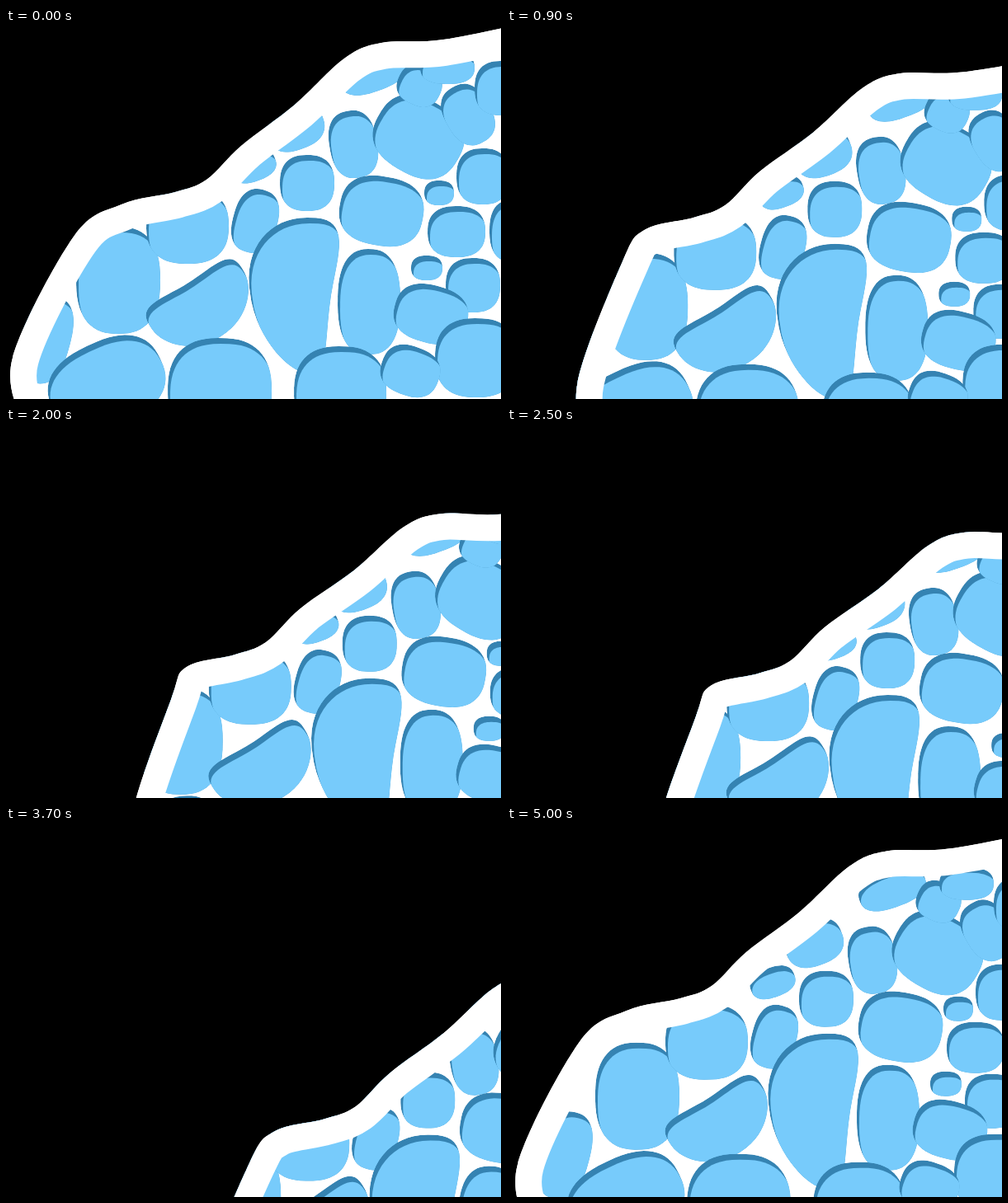
Recreate the animation shown at these times as an HTML page with a canvas. Size 600 by 450 pixels, loop 5100 ms.

```html
<!DOCTYPE html>
<html lang="en">
<head>
<meta charset="utf-8">
<title>Foam wave</title>
<style>
  html, body { margin: 0; width: 100%; height: 100%; overflow: hidden; background: #000; }
  canvas { display: block; }
</style>
</head>
<body>
<canvas id="stage" width="600" height="450"></canvas>
<script>
const ctx = document.getElementById('stage').getContext('2d');
const LOOP = 5100, STEP = 100, TURN = 4400;
const LIGHT = '#77cbfb', DARK = '#3583b2', WHITE = '#fff';
const FOAM = 64;
const clamp = (v, lo, hi) => Math.max(lo, Math.min(hi, v));

// A rounded blob, optionally tilted (degrees), bent like a bean and tapered downwards
const cells = [];
function cell(x, y, rx, ry, tilt = 0, bend = 0, taper = 0) {
  const blob = new Path2D(), turn = tilt * Math.PI / 180;
  const round = v => Math.sign(v) * Math.abs(v) ** .8;
  for (let a = 0; a < 2 * Math.PI; a += .1) {
    const v = round(Math.sin(a));
    const px = rx * round(Math.cos(a)) * (1 + taper * v) + bend * v * v, py = ry * v;
    blob.lineTo(x + px * Math.cos(turn) - py * Math.sin(turn),
                y + px * Math.sin(turn) + py * Math.cos(turn));
  }
  blob.closePath();
  cells.push(blob);
}

// left
cell(48, 378, 30, 54, 15);
cell(122, 432, 72, 52, -25);
cell(136, 306, 51, 65);
cell(220, 240, 50, 46);
cell(240, 342, 38, 66, 58, -18);
cell(259, 440, 63, 64);
cell(302, 234, 27, 39, 15);
cell(300, 168, 28, 18, -20);
// middle
cell(345, 324, 49, 94, 0, 22, -.3);
cell(365, 188, 33, 34);
cell(350, 120, 36, 28, -20);
cell(421, 141, 29, 41, -10);
cell(455, 222, 51, 42, 10);
cell(440, 332, 38, 64);
cell(405, 442, 56, 56);
cell(500, 132, 55, 46, 30);
// top
cell(445, 55, 42, 22, -20);
cell(501, 70, 27, 24, 25);
cell(535, 48, 33, 20);
cell(560, 105, 28, 38, -30);
cell(600, 73, 32, 33);
// right
cell(578, 180, 32, 34);
cell(525, 200, 18, 15);
cell(546, 247, 35, 31);
cell(615, 246, 29, 38);
cell(510, 291, 19, 15);
cell(566, 312, 33, 33);
cell(515, 347, 45, 35, 15);
cell(570, 400, 50, 48);
cell(490, 416, 36, 30, 20);

// Shoreline at high water
const shoreline = [
  [20, 480], [8, 400], [82, 253], [140, 214], [205, 199], [243, 184],
  [285, 143], [350, 93], [410, 37], [455, 18], [530, 14], [650, -10], [760, -30]
];

// 0 at high water, 1 at the turn, 0 again when the wave is back
const ebbAt = (t, back) => clamp(t < TURN ? t / TURN : (back - t) / (back - TURN), 0, 1);

function shoreAt(t) {
  const ebb = ebbAt(t, LOOP - 50);
  const swell = Math.sin(Math.PI * ebb);
  const tuck = t < TURN ? 48 * Math.sqrt(Math.max(0, swell)) : 0;
  return shoreline.map(([x, y]) => [
    x + 234 * ebb ** 1.5 + tuck * clamp((150 - x) / 70, 0, 1.5),
    y + 191 * ebb ** 1.15 + swell * Math.max(0, x - 285) * .06
  ]);
}

// Catmull-Rom spline along the shore, closed below the stage
function waterPath(pts) {
  const path = new Path2D(), last = pts.length - 1;
  const at = i => pts[clamp(i, 0, last)];
  path.moveTo(...pts[0]);
  for (let i = 0; i < last; i++) {
    const [a, b, c, d] = [at(i - 1), at(i), at(i + 1), at(i + 2)];
    path.bezierCurveTo(
      b[0] + (c[0] - a[0]) / 6, b[1] + (c[1] - a[1]) / 6,
      c[0] - (d[0] - b[0]) / 6, c[1] - (d[1] - b[1]) / 6, ...c);
  }
  path.lineTo(1000, 700);
  path.lineTo(pts[0][0], 700);
  path.closePath();
  return path;
}

function drawCell(blob) {
  ctx.save();
  ctx.clip(blob);
  ctx.fillStyle = DARK;
  ctx.fill(blob);
  ctx.translate(3, 7);
  ctx.fillStyle = LIGHT;
  ctx.fill(blob);
  ctx.restore();
}

function draw(t) {
  const water = waterPath(shoreAt(t));
  const drift = ebbAt(t, LOOP) ** 1.07;

  ctx.fillStyle = '#000';
  ctx.fillRect(0, 0, 600, 450);
  ctx.fillStyle = WHITE;
  ctx.fill(water);

  ctx.save();
  ctx.clip(water);
  ctx.save();
  ctx.translate(176 * drift, 174 * drift);
  cells.forEach(drawCell);
  ctx.restore();
  ctx.strokeStyle = WHITE;
  ctx.lineWidth = FOAM;
  ctx.lineJoin = 'round';
  ctx.stroke(water);
  ctx.restore();
}

const start = performance.now();
function tick() {
  const t = (performance.now() - start) % LOOP;
  draw(Math.floor(t / STEP) * STEP);
  requestAnimationFrame(tick);
}
tick();
</script>
</body>
</html>
```
